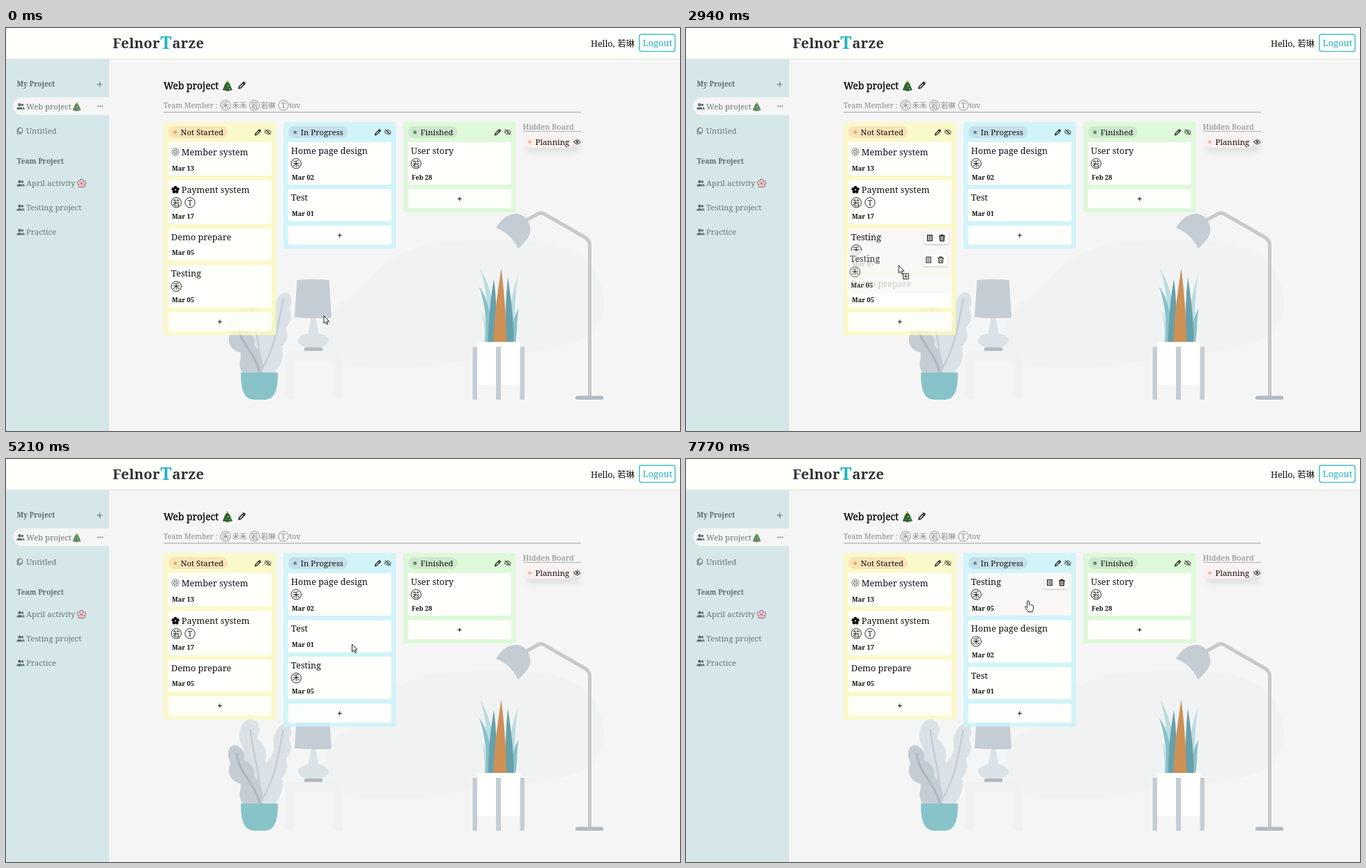
Write an HTML page that moves like this. It is 967 by 579 pixels and loops after 8 s.

```html
<!DOCTYPE html>
<html lang="en">
<head>
<meta charset="utf-8">
<title>Project board</title>
<style>
html, body { margin: 0; width: 100%; height: 100%; overflow: hidden; background: #f5f5f5; }
svg { display: block; width: 100vw; height: 100vh; font-family: "Noto Serif", "Noto Sans CJK TC", "Noto Sans CJK", serif; }
text { white-space: pre; }
.bold { font-weight: 700; }
.line { fill: none; stroke: currentColor; stroke-linecap: round; stroke-linejoin: round; }
.tools { display: none; }
.hover > .tools { display: inline; }
.card > .face { fill: #fffffc; }
.hover > .face { fill: #f9f8f7; }
#ghost { opacity: .8; }
</style>
</head>
<body>
<svg id="stage" viewBox="0 0 967 579">
  <defs>
    <filter id="soft" x="-30%" y="-60%" width="160%" height="260%"><feGaussianBlur stdDeviation="4"/></filter>
    <filter id="lift" x="-20%" y="-30%" width="140%" height="170%"><feGaussianBlur stdDeviation=".9"/></filter>
  </defs>

  <rect width="967" height="579" fill="#f5f5f5"/>
  <path fill="#f1f3f3" d="M470 478C500 492 590 492 650 480C720 464 820 470 848 430C868 400 856 358 835 335C800 300 700 300 620 308C540 318 520 370 480 395C450 420 445 462 470 478Z"/>

  <!-- potted plant -->
  <path fill="#dbe2e7" d="M362 496C356 480 366 470 372 456C366 440 380 432 384 418C382 400 388 383 400 380C412 380 411 394 406 404C413 414 408 424 402 430C406 446 402 452 396 458C400 474 394 486 384 496Z"/>
  <path fill="#dbe2e7" d="M362 495C350 480 336 462 346 452C330 440 334 424 342 418C330 404 334 376 350 374C364 374 366 392 360 402C376 412 374 428 372 434C384 446 384 460 378 470C384 480 378 490 376 496Z"/>
  <g class="line" color="#c5cdd4" stroke-width="2.6">
    <path d="M351 389C352 420 367 450 364 494M398 390C390 425 388 455 368 488"/>
  </g>
  <path fill="#c5cdd4" d="M340 496C330 482 340 474 336 466C322 464 316 448 322 438C316 424 318 412 328 411C338 412 344 424 341 432C354 438 358 448 356 456C366 464 370 480 368 496Z"/>
  <path class="line" color="#aeb7c0" stroke-width="3" d="M331 423C334 452 354 460 364 494"/>
  <path fill="#88c3c9" d="M337 495H390C390 520 386 534 370 534H357C341 534 337 520 337 495Z"/>

  <!-- table lamp -->
  <path fill="#f1f1f1" d="M400 464H483V533H469V478H413V533H400Z"/>
  <path fill="#dbe2e7" d="M438 416H444L449 441H433Z"/>
  <ellipse cx="441" cy="449" rx="22" ry="11" fill="#dbe2e7"/>
  <rect x="428" y="459" width="26" height="5" rx="1" fill="#b2bac3"/>
  <path fill="#c5cdd4" d="M417.5 362Q440 360 463.500 362L467 416.500Q440 418 414 415.500Z"/>

  <!-- tall plant -->
  <g fill="#b9dde1">
    <path d="M680 345C690 362 698 382 699 410L697 451H691C693 410 690 375 680 345Z"/>
    <path d="M735 355C730 378 731 410 727 451H720C721 415 724 385 735 355Z"/>
    <path d="M682 405C688 418 691 434 691 451H686C688 436 686 420 682 405Z"/>
  </g>
  <g fill="#86c2c9">
    <path d="M679 372C690 387 697 408 697 451H688C690 420 687 395 679 372Z"/>
    <path d="M736 403C732 420 734 436 731 451H723C725 430 728 415 736 403Z"/>
  </g>
  <g fill="#66a0ac">
    <path d="M700 361C695 388 692 420 692 451H704C704 420 704 390 700 361Z"/>
    <path d="M720 358C717 388 716 420 716 451H728C729 420 724 385 720 358Z"/>
  </g>
  <path fill="#ce9055" d="M710.500 345C706 378 700 412 699.500 451H718C718 412 714 375 710.500 345Z"/>
  <rect x="676" y="451" width="62" height="62" fill="#fffffd"/>
  <path fill="#c5cdd4" d="M669.500 458H676V534H669.500ZM703 458H710V534H703ZM737.500 458H744V534H737.500Z"/>

  <!-- floor lamp -->
  <path class="line" color="#c9c9c9" stroke-width="5" d="M837.500 530V312Q837.500 305 831 301L772 267Q767.500 264.500 763 267L745 277"/>
  <rect x="817" y="528.500" width="40" height="5.500" rx="2.500" fill="#b2bac3"/>
  <path fill="#c5cdd4" d="M703 287C712 272 722 267 733 267C744 268 753 279 752.500 291C751 302 743 309 735 317C727 302 718 293 703 287Z"/>

  <g id="page"></g>
  <g id="board"></g>
  <g id="ghost"></g>
  <g id="cursors">
    <path id="arrow" fill="#fff" stroke="#222" stroke-width="1" d="M.5.500V11.500L3 9.200L4.800 13L6.500 12.200L4.800 8.500H8Z"/>
    <g id="copy">
      <path fill="#fff" stroke="#222" stroke-width="1" d="M.5.500V11.500L3 9.200L4.800 13L6.500 12.200L4.800 8.500H8Z"/>
      <rect x="7" y="12.500" width="7.500" height="7.500" fill="#fff" stroke="#222"/>
      <path stroke="#222" d="M8.500 16.250H13M10.750 14V18.500"/>
    </g>
    <path id="hand" fill="#fff" stroke="#222" stroke-width="1" stroke-linejoin="round" d="M-1.400 9.500V1Q-1.200-.3 0-.3Q1.200-.3 1.400 1V5.400Q2.600 4.500 3.600 5.800Q4.900 5 5.700 6.400Q7.400 6 7.400 7.800V11Q7.300 12.800 6 14V15.700H-.4V14.200L-4.500 9.300Q-4.800 7.800-3.400 7.700Q-2.500 8-1.400 9.500Z"/>
    <g id="block" fill="none" stroke="#111" stroke-width="1.700">
      <circle r="5.200" fill="#fff"/><path d="M-3.600-3.600L3.600 3.600"/>
    </g>
  </g>
</svg>

<script>
const $ = id => document.getElementById(id);
const TEAL = '#1fb3c1';

// ---------- drawing helpers (all return SVG markup) ----------
const text = (x, y, size, str, fill = '#111', cls = '') =>
  `<text x="${x}" y="${y}" font-size="${size}" fill="${fill}" class="${cls}">${str}</text>`;
const box = (x, y, w, h, r, fill, extra = '') =>
  `<rect x="${x}" y="${y}" width="${w}" height="${h}" rx="${r}" fill="${fill}" ${extra}/>`;
const at = (x, y, body, color = '#111', scale = 1) =>
  `<g transform="translate(${x} ${y}) scale(${scale})" color="${color}">${body}</g>`;
const line = (d, w = 1) => `<path class="line" stroke-width="${w}" d="${d}"/>`;
const ring = (x, y, ch, fill = '#111') =>
  `<circle cx="${x}" cy="${y}" r="7.200" fill="none" stroke="${fill}" stroke-width=".9"/>
   <text x="${x}" y="${y + 3.8}" font-size="10.500" fill="${fill}" text-anchor="middle">${ch}</text>`;

const pencil = line('M-4 4L-3.400 1.600L1.800-3.600Q2.400-4.200 3-3.600L3.600-3Q4.200-2.400 3.600-1.800L-1.600 3.400ZM1-2.800L2.800-1', 1.2);
const eyeShape = 'M-4.600 0Q0-6 4.600 0Q0 6-4.600 0Z';
const eye = line(eyeShape) + '<circle r="1.400" fill="currentColor"/>';
const eyeOff = line(eyeShape, .9) + '<circle r="1.100" fill="currentColor"/>' + line('M-3.800-3.600L3.800 3.600');
const people = `<g fill="currentColor"><circle cx="4" cy="2.300" r="2.200"/><path d="M0 9V7.500C0 5 8 5 8 7.500V9Z"/>
  <circle cx="8" cy="2.500" r="1.700"/><path d="M8.800 9V7.300Q8.700 6.200 7.900 5.500C9.500 5.300 11 6 11 7.500V9Z"/></g>`;
const pages = line('M2.800.500H6.500L8 2V7H2.800ZM2.800 2.200H.7V9H5.800V7');
const tree = `<path fill="#7a5130" d="M-1.500 5H1.500V7.800H-1.500Z"/>
  <path fill="#23692f" stroke="#1c4a25" stroke-width=".6" d="M0-7L3.600-1.500L4.800 2L6.600 6Q0 7.500-6.600 6L-4.800 2L-3.600-1.500Z"/>
  <circle cy="-6.500" r="1.500" fill="#f2c23c"/><circle cx="-2" cy="3.500" r="1" fill="#d8453b"/>
  <circle cx="1" cy="0" r="1" fill="#f2c23c"/><circle cx="3" cy="4" r=".9" fill="#6fb4de"/>`;
const petals = (n, r, size, attrs) => Array.from({ length: n }, (_, i) => {
  const a = i / n * 2 * Math.PI - Math.PI / 2;
  return `<circle cx="${(r * Math.cos(a)).toFixed(2)}" cy="${(r * Math.sin(a)).toFixed(2)}" r="${size}" ${attrs}/>`;
}).join('');
const blossom = petals(5, 3.8, 2.6, 'fill="#e8c8d0" stroke="#8d5f6b" stroke-width=".8"') +
  '<circle r="3.600" fill="#e8c8d0"/><circle r="1.400" fill="#b3667a"/>';
const daisy = petals(8, 4, 1.6, 'fill="none" stroke="#777" stroke-width=".7"') + '<circle r="1.500" fill="none" stroke="#777" stroke-width=".7"/>';
const clover = petals(5, 3.5, 2.3, 'fill="#111"') + '<circle r="2.400" fill="#111"/><circle r="1" fill="#fffffc"/>';
const list = line('M-3.300-4H3.300V4H-3.300Z', 1.2) + line('M-1.500-2H1.500M-1.500 0H1.500M-1.500 2H1.500', .9);
const trash = line('M-4-2.700H4M-1.500-2.900V-4.200H1.500V-2.900M-3-2.400L-2.700 4.300H2.700L3-2.400', 1.3) + line('M-1-.8V2.600M1-.8V2.600', .9);

// ---------- fixed page parts ----------
const side = '#5f6b6d', sideSoft = '#6c7879';
const item = (y, str, icon = people) => at(15.5, y - 8.5, icon, side) + text(29, y, 11.3, str, sideSoft);

$('page').innerHTML =
  box(0, 45, 148, 534, 0, '#d5e7e9') +
  `<path fill="#f5f5f5" d="M148 99.500H23A12.750 12.750 0 0 0 23 125H148Z"/>` +
  box(0, 0, 967, 44, 0, '#fffffb') + box(0, 44, 967, 1, 0, '#e6e4d8') +
  `<g letter-spacing=".3">` +
  text(153, 28.5, 20, 'Felnor', '#2d3133', 'bold') +
  text(221.5, 29.5, 24.5, 'T', TEAL, 'bold') +
  text(238.5, 28.5, 20, 'arze', '#2d3133', 'bold') + '</g>' +
  text(839, 26.7, 12.5, 'Hello, 若琳') +
  box(908.7, 9.2, 51.2, 24.3, 3, '#fffffb', `stroke="${TEAL}" stroke-width="1.200"`) + text(913.5, 25.7, 12.9, 'Logout', TEAL) +
  text(15.5, 84, 10.1, 'My Project', side, 'bold') +
  at(134.5, 81, line('M-3.500 0H3.500M0-3.500V3.500'), side) +
  item(116.5, 'Web project') + `<g opacity=".75">${at(101.5, 113, tree, side, .85)}</g>` +
  [132.2, 135.2, 138.2].map(x => `<circle cx="${x}" cy="112.500" r=".9" fill="${side}"/>`).join('') +
  item(151.5, 'Untitled', pages) +
  text(15.5, 195, 10.1, 'Team Project', side, 'bold') +
  item(227, 'April activity') + at(108.5, 223.5, blossom) +
  item(262, 'Testing project') + item(297, 'Practice') +
  `<g stroke="#000" stroke-width=".3">${text(226, 87.7, 13.8, 'Web project', '#000')}</g>` +
  at(317.7, 83, tree) + at(338.5, 82.3, pencil, '#111', 1.15) +
  text(226, 114.7, 10.4, 'Team Member :', '#8b8b8b') +
  ring(315, 111, '禾', '#858585') + text(324.5, 114.8, 10.6, '禾禾', '#858585') +
  ring(356.5, 111, '若', '#858585') + text(365.5, 114.8, 10.6, '若琳', '#858585') +
  ring(398, 111, 'T', '#858585') + text(406.5, 114.7, 10.6, 'tov', '#858585') +
  box(226, 120.5, 599, 1, 0, '#a0a0a0') +
  text(741.5, 145.5, 11, 'Hidden Board', '#858585') + box(742, 148, 83, 1, 0, '#b0b0b0') +
  box(746, 160, 78, 20, 8, '#000', 'opacity=".07" filter="url(#soft)"') +
  box(742, 155, 72, 17, 8.5, '#faf0ed') +
  '<circle cx="751.500" cy="163.700" r="2.500" fill="#efb8ac"/>' +
  text(759.5, 167.7, 11.4, 'Planning') + at(819.5, 163.7, eye);

// ---------- columns and cards ----------
const TOP = 164, GAP = 6.4, CARD_W = 148;
const columns = [
  { x: 226, name: 'Not Started', fill: '#fcfabe', pill: '#fae3b8', pillW: 85, dot: '#e0af62' },
  { x: 398, name: 'In Progress', fill: '#c9f4fb', pill: '#c6e0eb', pillW: 85, dot: '#5f92a6' },
  { x: 570, name: 'Finished', fill: '#d9fbd2', pill: '#cde8cc', pillW: 71, dot: '#648b72' }
];
const cards = {
  member: { title: 'Member system', date: 'Mar 13', icon: daisy },
  pay: { title: 'Payment system', date: 'Mar 17', icon: clover, who: '若T' },
  demo: { title: 'Demo prepare', date: 'Mar 05' },
  testing: { title: 'Testing', date: 'Mar 05', who: '禾' },
  home: { title: 'Home page design', date: 'Mar 02', who: '禾' },
  test: { title: 'Test', date: 'Mar 01' },
  story: { title: 'User story', date: 'Feb 28', who: '若' }
};

function cardBody(c) {
  const drop = c.icon ? 2 : 0;
  return `<rect class="face" width="${CARD_W}" height="${c.h}" rx="2"/>` +
    (c.icon ? at(10.3, 14, c.icon) : '') +
    text(c.icon ? 19 : 4.3, 16.7 + drop, 12.6, c.title) +
    [...(c.who || '')].map((ch, i) => ring(11.5 + i * 19.7, 30.7 + drop * .8, ch)).join('') +
    text(5.3, c.h - 7.6, 9.2, c.date, '#111', 'bold') +
    '<g class="tools">' + box(109, 5.5, 35, 18, 2, '#000', 'opacity=".25" filter="url(#lift)"') +
    box(109, 4.5, 35, 18, 2, '#fffffd') + at(117, 13.5, list) + at(134.5, 13.5, trash) + '</g>';
}

const mainBoard = $('board');
mainBoard.innerHTML = columns.map((c, i) => {
  const x = c.x + 7;
  return `<rect id="col${i}" x="${c.x}" y="135" width="161.500" rx="3" fill="${c.fill}" opacity=".8"/>` +
    box(x, 141, c.pillW, 17, 8.5, c.pill) +
    `<circle cx="${x + 9.7}" cy="149.700" r="2.500" fill="${c.dot}"/>` +
    text(x + 17.8, 153.7, 11.4, c.name) +
    at(c.x + 135.5, 149.8, pencil) + at(c.x + 149.8, 149.5, eyeOff) +
    `<g id="add${i}">` + box(0, 0, CARD_W, 27.4, 2, '#fffffc', 'opacity=".95"') +
    at(74, 14, line('M-2.500 0H2.500M0-2.500V2.500')) + '</g>';
}).join('');

for (const key in cards) {
  const c = cards[key];
  c.h = 46 + (c.icon ? 2.1 : 0) + (c.who ? 15.1 : 0);
  mainBoard.insertAdjacentHTML('beforeend', `<g id="${key}" class="card">${cardBody(c)}</g>`);
  c.el = $(key);
}
$('ghost').innerHTML = `<g class="card hover">${cardBody(cards.testing)}</g>`;

// ---------- timeline ----------
const LOOP = 8000;
const start = ['member pay demo testing', 'home test', 'story'];
const orders = [
  [0, start],
  [1800, ['member pay testing demo', 'home test', 'story']],
  [3330, start],
  [5130, ['member pay demo', 'home test testing', 'story']],
  [7130, ['member pay demo', 'testing home test', 'story']]
];
const drags = [[1150, 1800], [2680, 3330], [3850, 5130], [6450, 7130]];
const still = [[0, 60], [5130, 5640]];   // pointer rests, hover not refreshed

const smooth = u => u * u * (3 - 2 * u);
const speedUp = u => u ** 1.4;
const slowDown = u => 1 - (1 - u) ** 2;
// time, x, y, easing into this point
const path = [
  [0, 455.5, 413], [60, 455.5, 413], [700, 312.5, 379], [1140, 312.5, 379],
  [1340, 311, 338, speedUp], [1700, 317, 306, slowDown], [2100, 317, 306], [2450, 306.5, 309],
  [2670, 306.5, 309], [3250, 302.5, 379], [3840, 302.5, 379], [4980, 496, 265.5],
  [5640, 496, 265.5], [6250, 479.5, 322], [6440, 479.5, 322], [6850, 491, 191, slowDown],
  [7080, 491, 188], [7640, 491, 188], [7770, 491, 204], [LOOP, 491, 204]
];

function pointer(t) {
  const i = Math.max(1, path.findIndex(p => p[0] >= t));
  const [t0, x0, y0] = path[i - 1], [t1, x1, y1, ease = smooth] = path[i];
  const u = ease((t - t0) / (t1 - t0));
  return [x0 + (x1 - x0) * u, y0 + (y1 - y0) * u];
}

const inside = (t, spans) => spans.find(([a, b]) => t >= a && t < b);
const move = (el, x, y) => el.setAttribute('transform', `translate(${x.toFixed(2)} ${y.toFixed(2)})`);
const show = (el, on) => { el.style.display = on ? '' : 'none'; };

let shown;
function arrange(order) {
  if (order === shown) return;
  shown = order;
  order.forEach((keys, i) => {
    const x = columns[i].x + 6.8;
    let y = TOP;
    for (const key of keys.split(' ')) {
      const c = cards[key];
      c.x = x;
      c.y = y;
      move(c.el, x, y);
      y += c.h + GAP;
    }
    move($('add' + i), x, y);
    $('col' + i).setAttribute('height', y + 33.2 - 135);
  });
}

function draw(t) {
  arrange(orders.filter(o => o[0] <= t).pop()[1]);
  const [x, y] = pointer(t);
  const drag = inside(t, drags);
  const under = Object.keys(cards).find(k => {
    const c = cards[k];
    return x >= c.x && x <= c.x + CARD_W && y >= c.y && y <= c.y + c.h;
  });
  const hover = drag ? 'testing' : inside(t, still) ? null : under;
  for (const k in cards) cards[k].el.classList.toggle('hover', k === hover);

  show($('ghost'), drag);
  if (drag) {
    const [gx, gy] = pointer(drag[0] - 10);
    move($('ghost'), cards.testing.x + x - gx, cards.testing.y + y - gy);
  }
  const shape = drag ? (under ? 'copy' : 'block') : hover ? 'hand' : 'arrow';
  for (const id of ['arrow', 'copy', 'hand', 'block']) show($(id), id === shape);
  move($('cursors'), x, y);
}

const origin = performance.now();
function tick() {
  draw((performance.now() - origin) % LOOP);
  requestAnimationFrame(tick);
}
tick();
</script>
</body>
</html>
```
